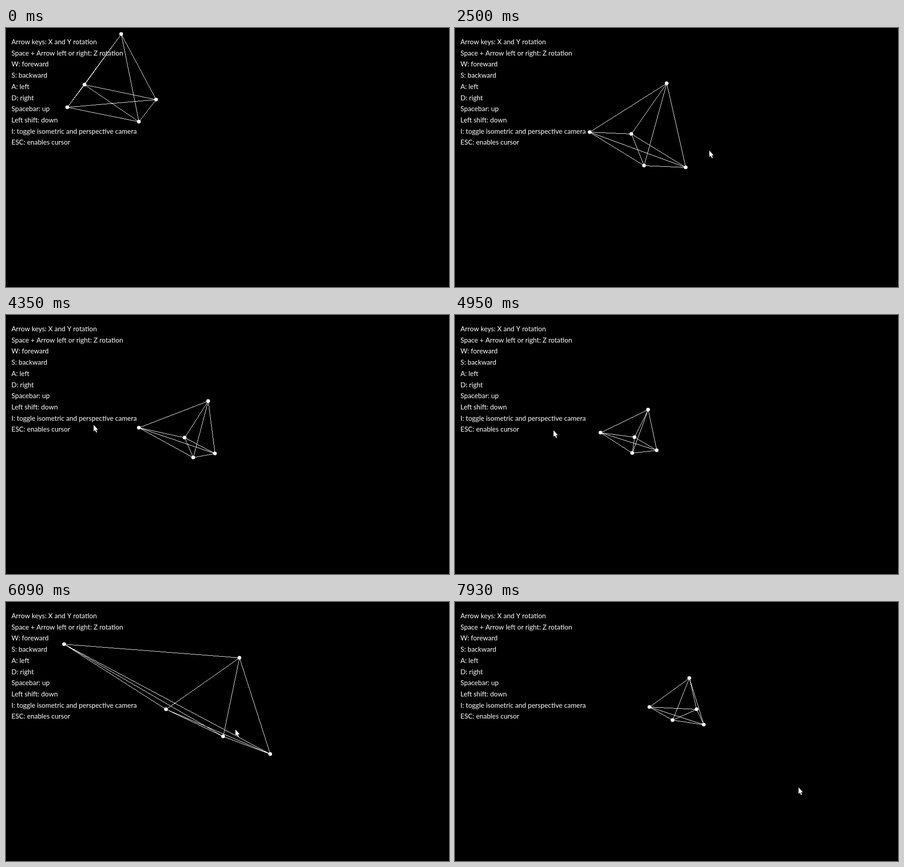
An HTML page with a canvas that plays this animation: 978 by 573 pixels, repeating every 7990 ms.

```html
<!DOCTYPE html>
<html lang="en">
<head>
<meta charset="utf-8">
<title>Wireframe pyramid</title>
<style>
  html, body { margin: 0; width: 100%; height: 100%; overflow: hidden; background: #000; }
  canvas { display: block; }
</style>
</head>
<body>
<canvas id="stage" width="978" height="573"></canvas>
<script>
const ctx = document.getElementById('stage').getContext('2d');
const W = 978, H = 573, LOOP = 7990, STEP = 66;
const FOCAL = H / 2 / Math.tan(Math.PI / 3); // 120 degree field of view

const HELP = [
  'Arrow keys: X and Y rotation',
  'Space + Arrow left or right: Z rotation',
  'W: foreward',
  'S: backward',
  'A: left',
  'D: right',
  'Spacebar: up',
  'Left shift: down',
  'I: toggle isometric and perspective camera',
  'ESC: enables cursor'
];

// x, y: centre of the base on screen; size: half its diagonal; angles in degrees
const START = {
  x: 233, y: 166.3, size: 116.5, roll: 7.8, pitch: -19.6, yaw: -34.2,
  perspective: 0, mouseX: 760, mouseY: 522
};

// Each move blends the given values from wherever the previous move left them
const MOVES = [
  { from: 470, to: 1254, x: 403, y: 269, roll: 23.5, pitch: -13.6, yaw: -13.5, mouseX: 561, mouseY: 271 },
  { from: 3099, to: 3100, x: 443, y: 277, size: 62.5, perspective: 1 },
  { from: 3300, to: 3828, x: 481.8, y: 298.5, roll: 26, yaw: -28, mouseX: 470, mouseY: 222 },
  { from: 3828, to: 4092, x: 400, y: 285, size: 70, pitch: 0, yaw: -45, mouseX: 224, mouseY: 237 },
  { from: 4092, to: 4520, size: 80, yaw: -62, mouseX: 158, mouseY: 250 },
  { from: 4520, to: 4950, x: 394.2, y: 282.7, size: 55.5, pitch: 5.5, yaw: -57.6, mouseX: 217, mouseY: 255 },
  { from: 4950, to: 5400, x: 475, y: 290, size: 185, pitch: -6.7, yaw: -45 },
  { from: 5400, to: 5810, x: 445, y: 280, size: 120, yaw: -25 },
  { from: 4950, to: 6072, mouseX: 506, mouseY: 282 },
  { from: 5810, to: 6072, x: 440, y: 274.4, size: 136, roll: 24.4, yaw: -17.4 },
  { from: 6072, to: 6600, x: 490, y: 255, size: 72, roll: 15, pitch: -10, yaw: -60 },
  { from: 6072, to: 6996, mouseX: 760, mouseY: 329 },
  { from: 6600, to: 6996, x: 496.6, y: 253, size: 66.8, roll: 13.5, pitch: -12.6, yaw: -73.9 },
  { from: 6996, to: 7326, pitch: -40, mouseY: 53 },
  { from: 7540, to: 7920, y: 253.8, size: 65, pitch: -2.6, yaw: -72, mouseX: 758, mouseY: 410 }
];

// Four corners of the square base and the apex; the height equals the side
const PYRAMID = [
  [1, 0, 0], [0, 0, 1], [-1, 0, 0], [0, 0, -1], [0, -Math.SQRT2, 0]
];

const ARROW = [[0.5, 0], [0.5, 14.5], [3.6, 11.6], [6, 17], [8.2, 16], [5.8, 10.8], [10, 10.8]];

function stateAt(t) {
  const s = { ...START };
  for (const { from, to, ...goal } of MOVES) {
    const k = Math.min(1, Math.max(0, (t - from) / (to - from)));
    for (const name in goal) s[name] += (goal[name] - s[name]) * k;
  }
  return s;
}

function turn(a, b, degrees) {
  const r = degrees * Math.PI / 180;
  return [a * Math.cos(r) - b * Math.sin(r), a * Math.sin(r) + b * Math.cos(r)];
}

function project([x, y, z], s) {
  [x, z] = turn(x, z, s.yaw);
  [y, z] = turn(y, z, s.pitch);
  [x, y] = turn(x, y, s.roll);
  const depth = Math.max(0.1, 1 + s.perspective * z * s.size / FOCAL);
  return [
    Math.round(W / 2 + (s.x - W / 2 + x * s.size) / depth),
    Math.round(H / 2 + (s.y - H / 2 + y * s.size) / depth)
  ];
}

function disc(x, y, r, color) {
  ctx.fillStyle = color;
  ctx.beginPath();
  ctx.arc(x, y, r, 0, Math.PI * 2);
  ctx.fill();
}

// Hard one-pixel line
function line([x0, y0], [x1, y1]) {
  const n = Math.max(1, Math.abs(x1 - x0), Math.abs(y1 - y0));
  for (let i = 0; i <= n; i++) {
    ctx.fillRect(Math.round(x0 + (x1 - x0) * i / n), Math.round(y0 + (y1 - y0) * i / n), 1, 1);
  }
}

function drawHelp() {
  ctx.fillStyle = '#fff';
  ctx.font = '15px Lato, "Open Sans", sans-serif';
  HELP.forEach((text, i) => ctx.fillText(text, 12, Math.round(36 + i * 24.7)));
}

function drawPyramid(s) {
  const points = PYRAMID.map(p => project(p, s));
  ctx.fillStyle = '#fff';
  points.forEach((p, i) => points.slice(i + 1).forEach(q => line(p, q)));
  points.forEach(([x, y]) => disc(x + 0.25, y + 0.25, 4.1, '#fff'));
}

function drawCursor(x, y) {
  ctx.beginPath();
  ARROW.forEach(([dx, dy]) => ctx.lineTo(x + dx, y + dy));
  ctx.closePath();
  ctx.lineWidth = 2;
  ctx.strokeStyle = '#000';
  ctx.stroke();
  ctx.fillStyle = '#fff';
  ctx.fill();
}

function draw(t) {
  const at = Math.floor((t + 4) / STEP) * STEP;
  const s = stateAt(at);
  ctx.fillStyle = '#000';
  ctx.fillRect(0, 0, W, H);
  drawHelp();
  drawPyramid(s);
  if (at < 528) return;
  const x = Math.round(s.mouseX), y = Math.round(s.mouseY);
  if (t >= 2370 && t < 2500) disc(x, y, 10, 'rgba(255, 255, 0, 0.47)'); // click
  drawCursor(x, y);
}

const begin = performance.now();
function tick() {
  draw((performance.now() - begin) % LOOP);
  requestAnimationFrame(tick);
}
tick();
</script>
</body>
</html>
```
